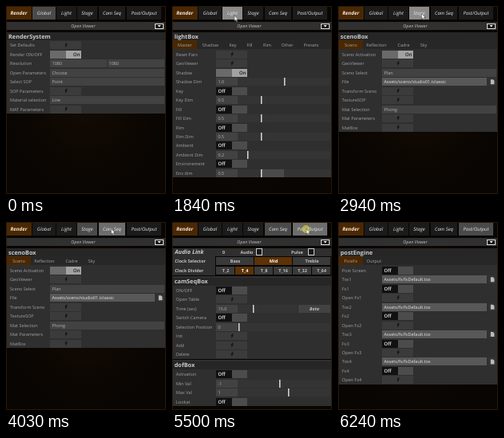
Recreate the animation shown at these times as an HTML page. Size 200 by 236 pixels, loop 6.61 s.

```html
<!DOCTYPE html>
<html lang="en">
<head>
<meta charset="utf-8">
<title>Render panel</title>
<style>
html, body { margin: 0; width: 100%; height: 100%; overflow: hidden; background: #090502; }
svg { display: block; width: 200px; height: 236px; }
text { font: 5.5px "Open Sans", "Noto Sans", sans-serif; fill: #a2a2a2; text-rendering: geometricPrecision; }
.title { font-size: 7.3px; font-weight: 700; fill: #cacaca; }
.tab { font-size: 6px; font-style: italic; font-weight: 500; fill: #e4e4e4; text-anchor: middle; }
.main { font-size: 6.3px; font-weight: 700; fill: #f4e6d2; }
.viewer { font-style: italic; fill: #c4c4c4; text-anchor: middle; }
.mid { text-anchor: middle; }
.lit { fill: #e6e6e6; }
.value { fill: #b4b4b4; }
.bold { font-weight: 700; fill: #c0c0c0; }
.bold.lit { fill: #fff; }
.italic { font-style: italic; }
.switch { font-size: 6px; font-weight: 600; fill: #f0f0f0; }
.dark { fill: #1a1a1a; }

/* Hard switches over one 6610 ms loop */
.page, .hover, #click, #cursor { animation: 6.61s step-end infinite; visibility: hidden; }
#render { animation-name: render; }
#light { animation-name: light; }
#sceno { animation-name: sceno; }
#cam { animation-name: cam; }
#post { animation-name: post; }
#hLight { animation-name: hLight; }
#hStage { animation-name: hStage; }
#hCam { animation-name: hCam; }
#hPost { animation-name: hPost; }
#click { animation-name: click; }
#cursor { animation-name: cursor; }
@keyframes render { 0% { visibility: visible } 27.837%, 100% { visibility: hidden } }
@keyframes light { 0%, 44.478%, 100% { visibility: hidden } 27.837% { visibility: visible } }
@keyframes sceno { 0%, 66.566%, 100% { visibility: hidden } 44.478% { visibility: visible } }
@keyframes cam { 0%, 88.805%, 100% { visibility: hidden } 66.566% { visibility: visible } }
@keyframes post { 0% { visibility: hidden } 88.805%, 100% { visibility: visible } }
@keyframes hLight { 0%, 38.880%, 100% { visibility: hidden } 22.239% { visibility: visible } }
@keyframes hStage { 0%, 60.968%, 100% { visibility: hidden } 38.880% { visibility: visible } }
@keyframes hCam { 0%, 83.207%, 100% { visibility: hidden } 60.968% { visibility: visible } }
@keyframes hPost { 0%, 94.402%, 100% { visibility: hidden } 83.207% { visibility: visible } }
@keyframes click { 0%, 88.805%, 100% { visibility: hidden } 83.207% { visibility: visible } }
@keyframes cursor {
  0% { visibility: hidden; transform: translate(85px, 14px) }
  16.642% { visibility: visible; transform: translate(85px, 14px) }
  22.239% { visibility: visible; transform: translate(77.5px, 11.5px) }
  38.880% { visibility: visible; transform: translate(104px, 8px) }
  44.478% { visibility: visible; transform: translate(104px, 9px) }
  49.924% { visibility: visible; transform: translate(104px, 8px) }
  60.968% { visibility: visible; transform: translate(131px, 8px) }
  66.566% { visibility: visible; transform: translate(129.5px, 9.2px) }
  77.610% { visibility: visible; transform: translate(131px, 9.2px) }
  83.207% { visibility: visible; transform: translate(167.5px, 8px) }
  94.402%, 100% { visibility: hidden; transform: translate(167.5px, 8px) }
}
</style>
</head>
<body>
<svg id="stage" viewBox="0 0 200 236"></svg>
<script>
const STEP = 11.45, LEFT = 55, RIGHT = 198;
const ORANGE = '#5c3206', BROWN = '#4a2804', FIELD = '#424242', BLACK = '#080604';

const rect = (x, y, w, h, fill) => `<rect x="${x}" y="${y}" width="${w}" height="${h}" fill="${fill}"/>`;
const text = (x, y, s, cls = '') => `<text x="${x}" y="${y + 2}" class="${cls}">${s}</text>`;
// Cells sit on whole pixels so that their edges stay sharp
const cell = (x, y, w, fill = FIELD) => rect(x, Math.round(y - 5), w, 10, fill);

// Controls: each takes the row's centre line
const pulse = () => y => cell(LEFT, y, 39, '#3b3b3b') +
  `<path d="M75.5 ${y - 3}l-2.2 3h1.5l-1 3 3.2-3.8h-1.6l1.4-2.2z" fill="#111"/>`;
const on = () => y => cell(LEFT, y, 20, '#6a6a6a') + cell(75, y, 19, '#a2a2a2') + text(84, y, 'On', 'switch dark');
const off = () => y => cell(LEFT, y, 20, '#111') + cell(75, y, 19, '#4c4c4c') + text(57.5, y, 'Off', 'switch');
const field = s => y => cell(LEFT, y, RIGHT - LEFT) + text(57.5, y, s, 'value');
const pair = (a, b) => y => cell(LEFT, y, 71) + cell(127, y, 71) + text(57.5, y, a, 'value') + text(128.5, y, b, 'value');
const file = s => y => cell(LEFT, y, 131, '#585858') + text(57.5, y, s, 'lit') + cell(188, y, 10, '#333') +
  `<path d="M190.8 ${y - 3}h3l1.6 1.6v4.4h-4.6z" fill="#bbb"/>`;
const slider = (s, x, end = RIGHT, fill = 0) => y => cell(LEFT, y, 27) + text(57.5, y, s, 'value') +
  cell(82, y, end - 82, '#343434') + (fill ? cell(x, y, fill, '#4a4a4a') : '') + cell(x, y, 1.5, '#d8d8d8');
const dim = (v, fill) => slider(v.toFixed(1), Math.round(82 + 57.5 * v), RIGHT, fill);
const timer = () => y => slider('15.0', 101, 156)(y) + cell(158, y, 40) + text(178, y, 'Beta', 'mid bold italic');
const choice = (names, pick) => y => rect(LEFT - 1, Math.round(y - 6), 145, 12, BLACK) + names.map((s, i) => {
  const w = (RIGHT - LEFT + 1) / names.length, x = LEFT + i * w;
  return cell(x, y, w - 1, i === pick ? ORANGE : '#3a3a3a') +
    text(x + w / 2, y, s, 'mid bold' + (i === pick ? ' lit' : ''));
}).join('');

const subTabs = names => y => rect(1, Math.round(y - 6), 198, 11, '#272727') +
  rect(1, Math.round(y - 6), 30, 11, BROWN) + names.map(([s, x]) => text(x, y, s, 'mid')).join('');

// Rows without a control are section titles
function panel(rows) {
  let y = 38, out = '';
  rows.forEach(([label, control, cls], i) => {
    if (control) {
      out += control(y) + text(cls ? 3.5 : 5, y, label, cls);
    } else {
      if (i) {
        y += 2.2;
        out += rect(1, Math.round(y - 8), 198, 1, '#090502');
      }
      out += rect(1, Math.round(y - 5), 198, 10, '#262626') + text(3, y + .5, label, 'title');
    }
    y += STEP;
  });
  return rect(1, 33, 198, Math.round(y - STEP / 2) - 33, '#2f2f2f') + out;
}

const audio = y => text(64.5, y, '0', 'mid bold') + text(85.5, y, 'Audio', 'bold') + text(149, y, 'Pulse', 'bold') +
  [105, 170].map(x => `<rect x="${x + .5}" y="33.5" width="7" height="8" fill="#181818" stroke="#ccc"/>`).join('');

const fxRows = [1, 2, 3, 4].flatMap(n => [
  ['Tox' + n, file('Assets/fx/fxDefault.tox')], ['Fx' + n, off()], ['Open Fx' + n, pulse()]
]);

const pages = {
  render: [
    ['RenderSystem'], ['Set Defaults', pulse()], ['Render ON/OFF', on()], ['Resolution', pair('1080', '1080')],
    ['Open Parameters', field('Choose')], ['Select SOP', field('Point')], ['SOP Parameters', pulse()],
    ['Material selection', field('Line')], ['MAT Parameters', pulse()]
  ],
  light: [
    ['lightBox'],
    ['', subTabs([['Master', 16], ['Shadow', 48], ['Key', 76], ['Fill', 97], ['Rim', 119], ['Other', 144], ['Presets', 174]])],
    ['Reset Pars', pulse()], ['GeoViewer', pulse()], ['Shadow', on()], ['Shadow Dim', dim(1)],
    ['Key', off()], ['Key Dim', dim(.5)], ['Fill', off()], ['Fill Dim', dim(.5)],
    ['Rim', off()], ['Rim Dim', dim(.5)], ['Ambient', off()], ['Ambient Dim', dim(.2)],
    ['Environement', off()], ['Env dim', dim(.5, 29)]
  ],
  sceno: [
    ['scenoBox'], ['', subTabs([['Sceno', 16], ['Reflection', 48], ['Cadre', 82], ['Sky', 107]])],
    ['Sceno Activation', on()], ['GeoViewer', pulse()], ['Sceno Select', field('Plan')],
    ['File', file('Assets/sceno/studio01.tclassic')], ['Transform Sceno', pulse()], ['TextureSOP', pulse()],
    ['Mat Selection', field('Phong')], ['Mat Parameters', pulse()], ['MatBox', pulse()]
  ],
  cam: [
    ['Audio Link', audio, 'title italic'],
    ['Clock Selector', choice(['Bass', 'Mid', 'Treble'], 1), 'bold'],
    ['Clock Divider', choice(['T_2', 'T_4', 'T_8', 'T_16', 'T_32', 'T_64'], 1), 'bold'],
    ['camSeqBox'], ['ON/OFF', off()], ['Open Table', pulse()], ['Time (sec)', timer()], ['Switch Camera', off()],
    ['Selection Position', slider('0', 83)], ['Init', pulse()], ['Add', pulse()], ['Delete', pulse()],
    ['dofBox'], ['Activation', off()], ['Min Val', slider('-1', 134)], ['Max Val', slider('1', 145)], ['Lookat', off()]
  ],
  post: [['postEngine'], ['', subTabs([['PostFx', 16], ['Output', 45]])], ['Post Screen', off()], ...fxRows]
};

const tabs = [
  ['Global', 33, 29, 'render'], ['Light', 63, 25, 'light', 'hLight'], ['Stage', 89, 25, 'sceno', 'hStage'],
  ['Cam Seq', 116, 33, 'cam', 'hCam'], ['Post/Output', 151, 43, 'post', 'hPost']
];
const tabBox = ([, x, w], fill) => rect(x, 1, w, 16, fill);

document.getElementById('stage').innerHTML = `
  <defs><radialGradient id="glow"><stop stop-color="#140b04"/><stop offset="1" stop-color="#090502"/></radialGradient></defs>
  <rect width="200" height="236" fill="url(#glow)"/>
  <rect x=".5" y=".5" width="199" height="235" fill="none" stroke="#2a1804"/>` +
  rect(1, 1, 198, 18, BLACK) + rect(1, 1, 31, 16, BROWN) +
  tabs.map(t => tabBox(t, '#1b1b1b')).join('') +
  rect(1, 20, 198, 10, '#303030') + text(96.5, 25, 'Open Viewer', 'viewer') +
  `<rect x="186.5" y="22.5" width="10" height="6" fill="#111" stroke="#e0e0e0"/>
   <path d="M189.5 24h4.2l-2.1 2.6z" fill="#fff"/>` +
  tabs.map(t => `<g id="${t[3]}" class="page">${tabBox(t, '#4a4a4a')}${panel(pages[t[3]])}</g>`).join('') +
  tabs.slice(1).map(t => `<g id="${t[4]}" class="hover" opacity=".36">${tabBox(t, '#fff')}</g>`).join('') +
  text(16, 9, 'Render', 'tab main') +
  tabs.map(([s, x, w]) => text(x + w / 2, 8.5, s, 'tab')).join('') +
  `<circle id="click" cx="167.5" cy="9" r="5" fill="#d8d040" opacity=".65"/>
   <path id="cursor" d="M.4 .3v7l1.6-1.4 1.2 2.5 1.2-.6-1.1-2.3h2z" fill="#fff" stroke="#222" stroke-width=".5"/>`;
</script>
</body>
</html>
```
